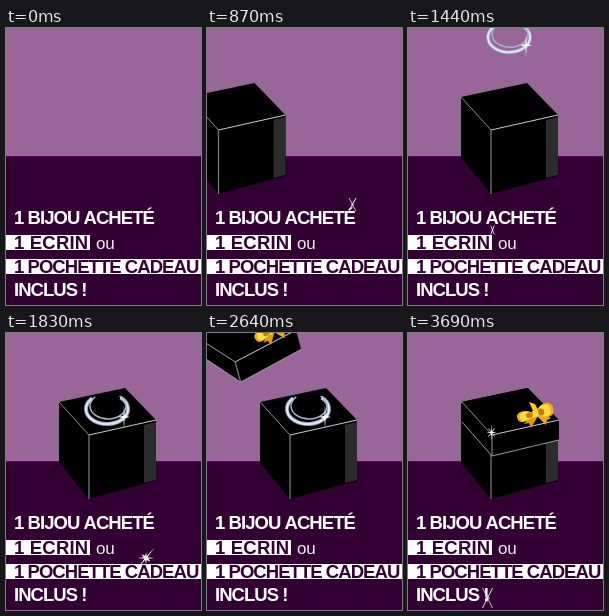
Recreate the animation shown at these times as an HTML page with a canvas. Size 195x277 px, loop 7.5 s.

```html
<!DOCTYPE html>
<html lang="fr">
<head>
<meta charset="utf-8">
<title>Bijou, écrin, pochette</title>
<style>
html, body { margin: 0; width: 100%; height: 100%; overflow: hidden; background: #330033; }
canvas { display: block; width: 195px; height: 277px; }
</style>
</head>
<body>
<canvas id="stage" width="195" height="277"></canvas>
<script>
const ctx = document.getElementById('stage').getContext('2d');
const LOOP = 7500, STEP = 30, DEG = Math.PI / 180;
const DARK = '#330033';
const SANS = '"Liberation Sans", Arial, sans-serif';

const clamp = v => Math.max(0, Math.min(1, v));
const progress = (t, from, to) => clamp((t - from) / (to - from));

function rect(color, x, y, w, h) {
  ctx.fillStyle = color;
  ctx.fillRect(x, y, w, h);
}

function fill(color, ...points) {
  ctx.beginPath();
  points.forEach(([x, y]) => ctx.lineTo(x, y));
  ctx.fillStyle = color;
  ctx.fill();
}

function line(color, width, ...points) {
  ctx.beginPath();
  points.forEach(([x, y]) => ctx.lineTo(x, y));
  ctx.strokeStyle = color;
  ctx.lineWidth = width;
  ctx.stroke();
}

// Runs paint with the origin at (x, y), turned by deg
function at(x, y, deg, paint) {
  ctx.save();
  ctx.translate(x, y);
  ctx.rotate(deg * DEG);
  paint();
  ctx.restore();
}

function label(str, x, y, color, spacing = -0.95, font = 'bold 18.5px ') {
  ctx.font = font + SANS;
  ctx.letterSpacing = spacing + 'px';
  ctx.fillStyle = color;
  ctx.fillText(str, x, y);
}

function drawBackground() {
  rect('#996699', 0, 0, 195, 128);
  rect(DARK, 0, 128, 195, 149);
  rect('#660066', 0, 128, 195, 1);
}

function drawText() {
  rect('#fff', 0, 207, 84, 15);
  rect('#fff', 0, 231, 195, 15);
  label('1 BIJOU ACHETÉ', 8, 196, '#fff');
  label('1 ECRIN', 8, 221, DARK, 0.2);
  label('ou', 90, 221, '#eee', -0.2, '17px ');
  label('1 POCHETTE CADEAU', 8, 245, DARK);
  label('INCLUS !', 8, 268, '#fff');
}

// A box seen from above, with the top front corner at the origin
function drawBox(height) {
  const left = [-30, -33], back = [36, -47], right = [67, -15], side = height * 0.95;
  const front = [0, 0], foot = [0, height];
  const footL = [left[0], left[1] + side], footR = [right[0], right[1] + side];
  fill('#000', left, back, right, footR, foot, footL);
  line('#8c8c8c', 1, left, front);
  line('#ccc', 1, front, right);
  line('#777', 1.3, front, foot);
  return [footL, foot, footR];
}

function drawCube(dx) {
  at(83 + dx, 102, 0, () => {
    drawBox(64);
    fill('#2c2c2c', [55, -10], [67, -13], [67, 45], [55, 48]);
  });
}

function drawBracelet(dy) {
  const ring = (color, width, x, y, rx, ry) => {
    ctx.beginPath();
    ctx.ellipse(x, y, rx, ry, 0, -50 * DEG, 225 * DEG);
    ctx.strokeStyle = color;
    ctx.lineWidth = width;
    ctx.stroke();
  };
  at(101, 76 + dy, 0, () => {
    ring('#8e96ac', 4, 0, 0, 21, 15);
    ring('#dde6f2', 2.2, 0, 0, 21, 15);
    ring('#aab4c8', 1.4, 1, -3, 18, 13);
    star(17, 8, 6, 12);
  });
}

function loop(side, length, thick) {
  const petal = (color, k) => {
    const x = side * length * k, y = thick * k;
    ctx.beginPath();
    ctx.moveTo(0, 0);
    ctx.bezierCurveTo(x * 0.5, -y * 1.6, x * 1.1, -y, x, 0);
    ctx.bezierCurveTo(x, y, x * 0.5, y * 1.1, 0, 0);
    ctx.fillStyle = color;
    ctx.fill();
  };
  petal('#f7ab0c', 1);
  petal('#ffdf3a', 0.85);
  petal('#c97a08', 0.5);
}

function drawBow() {
  fill('#e8960c', [-2, 0], [-11, 10], [-6, 9], [-4, 14], [3, 2]);
  fill('#f3a712', [1, 1], [11, 11], [12, 6], [16, 4], [4, -2]);
  fill('#ffc922', [-1, -1], [-6, -12], [0, -10], [4, -2]);
  at(0, 0, -15, () => {
    loop(-1, 18, 6);
    loop(1, 19, 8);
  });
  fill('#ffd83c', [-3, -3], [3, -4], [4, 2], [-2, 4]);
}

function drawLid(t) {
  const k = progress(t, 2520, 2820);
  const height = 21;
  at(84 * k, 123 * k, -25 * (1 - k), () => {
    ctx.translate(0, -height);
    line('#999', 1, ...drawBox(height));
    at(43, -21, 0, drawBow);
  });
}

function star(x, y, rx, ry) {
  const tips = Array.from({ length: 8 }, (_, i) => {
    const r = i % 2 ? 0.15 : 1, a = i * 45 * DEG;
    return [x + Math.cos(a) * rx * r, y + Math.sin(a) * ry * r];
  });
  fill('#fff', ...tips);
}

function sparkle(x, y, rx, ry) {
  line('#e8c8dc', 0.9, [x - rx, y - ry], [x + rx, y + ry]);
  line('#fff', 0.9, [x + rx, y - ry], [x - rx, y + ry]);
  star(x, y, rx * 0.6, ry * 0.6);
}

function drawSparkles(t) {
  if (t >= 480 && t < 900) sparkle(145.5, 176.5, 3.5, 6.5);
  if (t >= 900 && t < 1830) sparkle(84.5, 202, 1.8, 4.5);
  if (t >= 1500 && t < 2340) {
    at(140, 225, 40, () => star(0, 0, 6, 14));
    star(140, 225, 9, 6);
  }
  if (t >= 2820 && t < 3660) sparkle(15.5, 252, 1.8, 4.5);
  if (t >= 3030) {
    const k = progress(t, 3000, 3210);
    star(83.5, 99.5, 5 * k, 8 * k);
    sparkle(83.5, 99.5, 3 * k, 4 * k);
  }
  if (t >= 3660) {
    const k = progress(t, 3615, 3690);
    sparkle(79.5, 265, 5 * k, 10 * k);
  }
}

function draw(t) {
  drawBackground();
  drawText();
  if (t >= 690) drawCube(-143 * (1 - progress(t, 690, 1050)));
  if (t >= 1380 && t < 2790) drawBracelet(-89 * (1 - progress(t, 1380, 1620)));
  if (t >= 2520) drawLid(t);
  drawSparkles(t);
}

const begin = performance.now();
function tick() {
  const t = (performance.now() - begin) % LOOP;
  draw(Math.floor(t / STEP) * STEP);
  requestAnimationFrame(tick);
}
tick();
</script>
</body>
</html>
```
